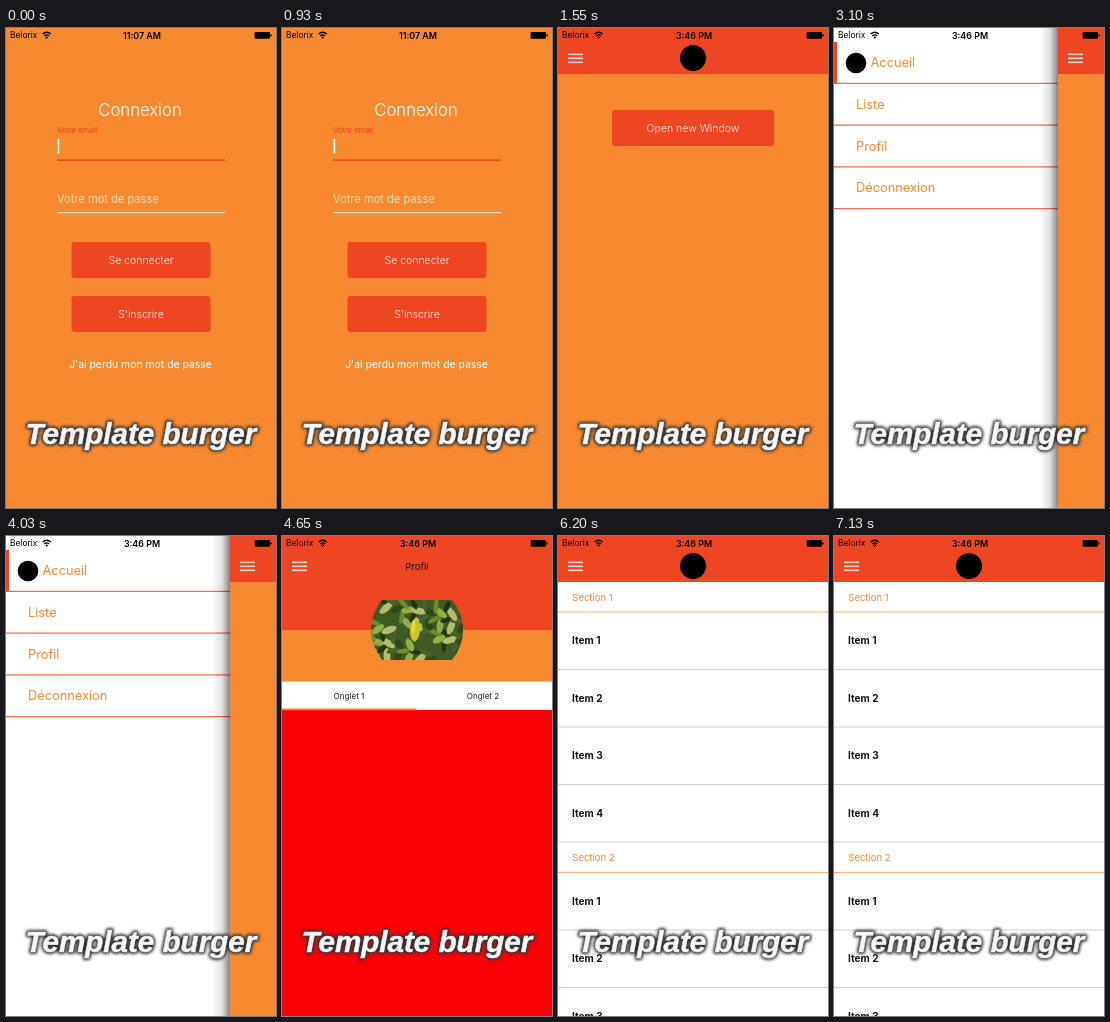
Write an HTML page that moves like this. It is 270 px wide and 480 px high and loops after 7.75 s.

```html
<!DOCTYPE html>
<html lang="fr">
<head>
<meta charset="utf-8">
<title>Template burger</title>
<style>
  html, body { margin: 0; width: 100%; height: 100%; overflow: hidden; background: #f78a30; }
  svg { display: block; width: 100vw; height: 100vh; }
  text { font-family: Inter, Roboto, "Open Sans", sans-serif; white-space: pre; }
  .caption text { font: italic bold 29.6px "Liberation Sans", Arial, sans-serif; }
</style>
</head>
<body>
<svg id="stage" viewBox="0 0 270 480" xmlns="http://www.w3.org/2000/svg"></svg>
<script>
const ORANGE = '#f78a30', RED = '#ee4622', WHITE = '#fff', BLACK = '#000';
const HOLD = 1550;

const rect = (x, y, w, h, fill, more = '') =>
  `<rect x="${x}" y="${y}" width="${w}" height="${h}" fill="${fill}" ${more}/>`;
const circle = (x, y, r, fill = BLACK) => `<circle cx="${x}" cy="${y}" r="${r}" fill="${fill}"/>`;
const ellipse = (x, y, rx, ry, turn, fill) =>
  `<ellipse rx="${rx}" ry="${ry}" fill="${fill}" transform="translate(${x} ${y}) rotate(${turn})"/>`;
const text = (s, x, y, size, fill, weight = 400, anchor = 'start') =>
  `<text x="${x}" y="${y}" font-size="${size}" fill="${fill}" font-weight="${weight}" text-anchor="${anchor}">${s}</text>`;
const centred = (s, x, y, size, fill, weight) => text(s, x, y, size, fill, weight, 'middle');

const statusBar = time =>
  text('Belorix', 4, 10.4, 8.4, BLACK) +
  `<g fill="none" stroke="#000" stroke-width="1.3">
     <path d="M36.6 6.1Q40.7 2.5 44.8 6.1M38.2 8Q40.7 5.8 43.2 8"/>
   </g><path d="M39.3 9.2Q40.7 8 42.1 9.2L40.7 10.8Z"/>` +
  centred(time, 136, 10.5, 8.9, BLACK, 600) +
  rect(248.6, 4, 15.4, 6.8, BLACK, 'rx="1"') + rect(264.4, 6.2, 1.3, 2.4, BLACK, 'rx=".5"');

const burger = x => [26, 30, 34].map(y => rect(x, y - .4, 15, 1.5, '#fbd9cd')).join('');
const header = () => rect(0, 0, 270, 46, RED) + burger(10);
const logo = () => circle(135, 30, 13);
const button = (label, x, y, w) =>
  rect(x, y, w, 36, RED, 'rx="3"') + centred(label, x + w / 2, y + 22, 10.5, '#fff5ee', 300);

function login() {
  return rect(0, 0, 270, 480, ORANGE) + statusBar('11:07 AM') +
    centred('Connexion', 134, 88, 16.7, WHITE, 300) +
    text('Votre email', 51, 105, 7.6, RED) +
    rect(51.6, 111, 1.6, 14.5, WHITE) +
    rect(51, 131.4, 168, 1.5, RED) +
    text('Votre mot de passe', 51, 174.6, 11.1, '#fcd9b8') +
    rect(51, 184, 168, 1.1, '#fce3cd') +
    button('Se connecter', 65.5, 214, 139) +
    button("S'inscrire", 65.5, 268, 139) +
    centred("J'ai perdu mon mot de passe", 134.5, 340, 10.4, WHITE);
}

function home() {
  return rect(0, 0, 270, 480, ORANGE) + header() + logo() + statusBar('3:46 PM') +
    button('Open new Window', 54, 82, 162);
}

function menu() {
  const rows = ['Accueil', 'Liste', 'Profil', 'Déconnexion'].map((s, i) =>
    text(s, i ? 22 : 36.5, 39 + i * 41.8, 12.8, ORANGE) +
    rect(0, 54.8 + i * 41.8, 224, 1, RED)).join('');
  return rect(0, 0, 270, 480, WHITE) + rows +
    rect(0, 14, 3, 41, RED) + circle(22, 35, 10.3) +
    rect(206, 0, 18, 480, 'url(#edge)') +
    rect(224, 0, 46, 480, ORANGE) + rect(224, 0, 46, 46, RED) + burger(234) + statusBar('3:46 PM');
}

function photo() {
  // Leaves fan out on a simple repeating rule.
  const greens = ['#6a8a2e', '#8fae45', '#20350f', '#b3bd6c', '#47622a', '#2f4a18'];
  let leaves = '';
  for (let i = 0; i < 60; i++) {
    leaves += ellipse(88 + i * 37 % 95, 64 + i * 23 % 61, 8 - i % 3, 2.4 + i % 2, i * 47 % 180, greens[i % 6]);
  }
  return `<g clip-path="url(#avatar)">` + rect(89, 64, 92, 60, '#3f5a22') + leaves +
    ellipse(133, 94, 5, 11.5, 4, '#cfc51d') + ellipse(131.5, 91, 2, 7, 4, '#e2d640') + '</g>';
}

function profile() {
  return rect(0, 0, 270, 94, RED) + rect(0, 94, 270, 52, ORANGE) +
    burger(10) + statusBar('3:46 PM') + centred('Profil', 135, 34, 9.5, '#2a0d06') + photo() +
    rect(0, 145.6, 270, 28.4, WHITE) +
    centred('Onglet 1', 67, 163, 8.1, '#222') + centred('Onglet 2', 201, 163, 8.1, '#222') +
    rect(0, 174, 270, 306, '#fd0006') + rect(0, 172.4, 134.5, 1.8, ORANGE);
}

function list() {
  const section = (n, y) => text('Section ' + n, 14.3, y + 18.7, 9.5, ORANGE) +
    rect(0, y + 29.5, 270, 1, '#f9ad6c');
  const items = (y, count) => Array.from({ length: count }, (_, i) =>
    text('Item ' + (i + 1), 14, y + 32 + i * 57.5, 10.1, '#151515', 700) +
    rect(0, y + 57 + i * 57.5, 270, .9, '#cbcbcb')).join('');
  return rect(0, 0, 270, 480, WHITE) + header() + logo() + statusBar('3:46 PM') +
    section(1, 46) + items(76, 4) + section(2, 306.4) + items(336.5, 3);
}

const defs = `<defs>
  <linearGradient id="edge">
    <stop offset="0" stop-color="#000" stop-opacity="0"/>
    <stop offset=".55" stop-color="#000" stop-opacity=".12"/>
    <stop offset="1" stop-color="#000" stop-opacity=".48"/>
  </linearGradient>
  <clipPath id="avatar" clip-path="url(#band)"><circle cx="135" cy="94" r="46"/></clipPath>
  <clipPath id="band"><rect x="89" y="64" width="92" height="60"/></clipPath>
  <filter id="glow" x="-10%" y="-40%" width="120%" height="180%"><feGaussianBlur stdDeviation="1.6"/></filter>
  <filter id="soft" x="-10%" y="-40%" width="120%" height="180%"><feGaussianBlur stdDeviation=".35"/></filter>
</defs>`;

const label = 'x="19.5" y="416" stroke-linejoin="round"';
const caption = `<g class="caption">
  <text ${label} fill="#333" stroke="#333" stroke-width="4" filter="url(#glow)">Template burger</text>
  <text ${label} fill="#f7f7f7" stroke="#f7f7f7" stroke-width=".5" filter="url(#soft)">Template burger</text>
</g>`;

const screens = [login, home, menu, profile, list];
const stage = document.getElementById('stage');
stage.innerHTML = defs + screens.map(draw => `<g class="screen">${draw()}</g>`).join('') + caption;
const layers = stage.querySelectorAll('.screen');

function tick() {
  const now = Math.floor(performance.now() / HOLD) % layers.length;
  layers.forEach((layer, i) => layer.setAttribute('display', i === now ? 'inline' : 'none'));
  requestAnimationFrame(tick);
}
tick();
</script>
</body>
</html>
```
